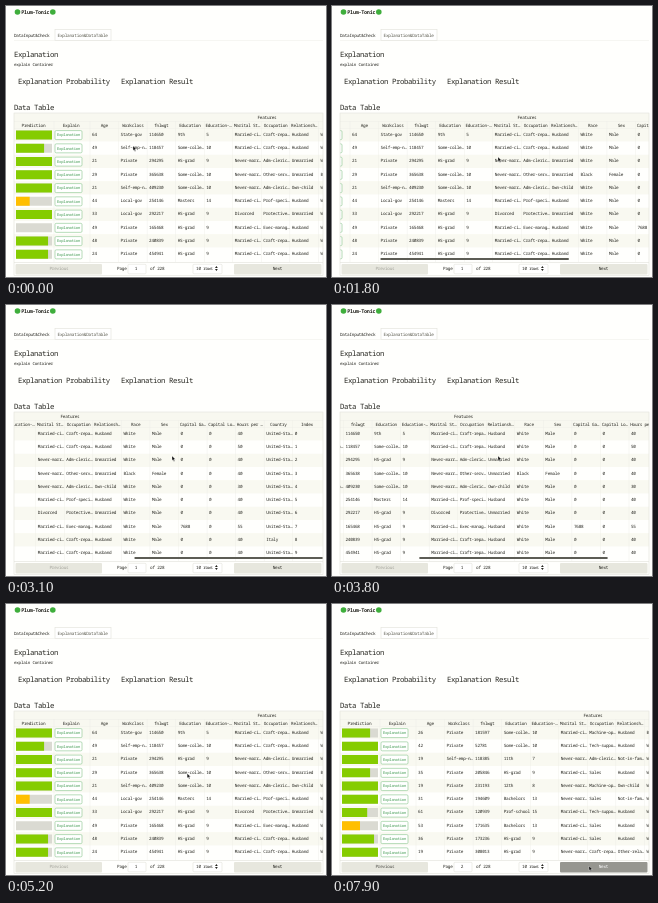
Write an HTML page that moves like this. It is 320 px wide and 271 px high and loops after 8 s.

```html
<!DOCTYPE html>
<html lang="en">
<head>
<meta charset="utf-8">
<title>Data table</title>
<style>
html, body { margin: 0; width: 100%; height: 100%; overflow: hidden; background: #fffffd; }
svg { display: block; width: 320px; height: 271px; }
text { font-family: "Noto Sans Mono", "DejaVu Sans Mono", monospace; font-weight: 500; letter-spacing: -.055em; text-rendering: geometricPrecision; white-space: pre; }
</style>
</head>
<body>
<svg id="stage" viewBox="0 0 320 271"></svg>
<script>
const INK = '#262620', LINE = '#ececE6', EDGE = '#e2e2da', BUTTON = '#e7e7de', LOOP = 8000;
const COL = 28.55, FIRST = 84, ROW = 13.25, TOP = 122.2, MAX = 197;

// fields: bar percentage, then one value per column
const pages = [`
100 64 State-gov 114650 9th 5 Married-civ-spouse Craft-repair Husband White Male 0 0 40 United-States 0
78 49 Self-emp-not-inc 118457 Some-college 10 Married-civ-spouse Craft-repair Husband White Male 0 0 50 United-States 1
100 21 Private 294295 HS-grad 9 Never-married Adm-clerical Unmarried White Male 0 0 40 United-States 2
100 29 Private 365638 Some-college 10 Never-married Other-service Unmarried Black Female 0 0 40 United-States 3
100 21 Self-emp-not-inc 409230 Some-college 10 Never-married Adm-clerical Own-child White Male 0 0 30 United-States 4
38 44 Local-gov 254146 Masters 14 Married-civ-spouse Prof-specialty Husband White Male 0 0 40 United-States 5
100 33 Local-gov 292217 HS-grad 9 Divorced Protective-serv Unmarried White Male 0 0 40 United-States 6
0 49 Private 165468 HS-grad 9 Married-civ-spouse Exec-managerial Husband White Male 7688 0 55 United-States 7
89 48 Private 240839 HS-grad 9 Married-civ-spouse Craft-repair Husband White Male 0 0 40 Italy 8
89 24 Private 454941 HS-grad 9 Married-civ-spouse Craft-repair Husband White Male 0 0 40 United-States 9`, `
78 26 Private 181597 Some-college 10 Married-civ-spouse Machine-op-inspct Husband Black
100 42 Private 52781 Some-college 10 Married-civ-spouse Tech-support Husband White
100 19 Self-emp-not-inc 118385 11th 7 Never-married Adm-clerical Not-in-family White
78 35 Private 205846 HS-grad 9 Married-civ-spouse Sales Husband White
100 19 Private 231193 12th 8 Never-married Machine-op-inspct Own-child White
100 31 Private 194609 Bachelors 13 Never-married Sales Not-in-family White
70 61 Private 120939 Prof-school 15 Married-civ-spouse Tech-support Husband White
50 53 Private 171635 Bachelors 13 Married-civ-spouse Sales Husband White
89 36 Private 173236 HS-grad 9 Married-civ-spouse Sales Husband White
100 19 Private 308013 HS-grad 9 Never-married Craft-repair Other-relative White`];

const heads = ['Age', 'Workclass', 'fnlwgt', 'Education', 'Education-num', 'Marital Status', 'Occupation',
  'Relationship', 'Race', 'Sex', 'Capital Gain', 'Capital Loss', 'Hours per week', 'Country', 'Index'];

const cut = s => s.length > 11 ? s.slice(0, 10) + '…' : s;
const rect = (x, y, w, h, fill, extra = '') =>
  `<rect x="${x}" y="${y}" width="${w}" height="${h}" fill="${fill}" ${extra}/>`;
// pitch is the advance of one character
const text = (x, y, s, pitch = 2.38, extra = '') =>
  `<text x="${x}" y="${y}" font-size="${pitch / .545}" fill="${INK}" ${extra}>${s.replace('&', '&amp;')}</text>`;
const mid = (x, y, s, extra = '') => text(x, y, s, 2.38, `text-anchor="middle" ${extra}`);
const outline = color => `stroke="${color}" stroke-width=".6"`;

function tableRow(line, i) {
  const [bar, ...cells] = line.split(' '), y = TOP + ROW * i;
  return rect(10, y + 2.3, 36, 9, '#dadad2')
    + rect(10, y + 2.3, 36 * bar / 100, 9, bar > 60 ? '#85cc00' : '#ffbf00')
    + rect(49, y + 2.4, 27, 9, '#fff', `rx="1.2" ${outline('#86c48c')}`)
    + text(51, y + 8.2, 'Explanation', 2.1, 'style="fill:#3f9a50"')
    + cells.map((s, c) => text(FIRST + 2 + COL * c, y + 7.7, cut(s))).join('');
}

function header() {
  return mid(27.5, 121, 'Prediction') + mid(65, 121, 'Explain') + mid(261, 113.2, 'Features')
    + heads.map((s, c) => mid(FIRST + COL * (c + .5), 121, cut(s))).join('')
    + [48, ...heads.map((_, c) => FIRST + COL * c)].map(x => rect(x - .2, 115, .4, 141, LINE)).join('');
}

const stripes = [0, 2, 4, 6, 8].map(i => rect(8, TOP + ROW * i, 309, ROW, '#f9f9f1')).join('');

stage.innerHTML = `
<clipPath id="view"><rect x="8" y="107" width="309" height="149"/></clipPath>
<circle cx="11.5" cy="6" r="2.8" fill="#3fae3c"/><circle cx="46.8" cy="6" r="2.8" fill="#3fae3c"/>
${text(15.3, 8, 'Plum-Tonic', 2.8, 'style="font-weight:600"')}
${rect(8, 34, 309, .5, LINE)}
${rect(49, 23.5, 56, 11, '#fff', outline(EDGE))}
${text(8, 30.8, 'DataInput&Check', 2.36)}
${text(51.5, 30.8, 'Explanation&DataTable', 2.4, 'style="fill:#5c5c50"')}
${text(8, 51, 'Explanation', 4)}
${text(8, 60, 'explain Container', 2.3)}
${text(12, 77.5, 'Explanation Probability', 4)}
${text(115, 77.5, 'Explanation Result', 4)}
${text(8, 103.5, 'Data Table', 4)}
${rect(8, 107, 309, 15.2, '#f8f8f0')}${stripes}
<g clip-path="url(#view)"><g id="body">${header()}
${pages.map(p => `<g class="page">${p.trim().split('\n').map(tableRow).join('')}</g>`).join('')}</g></g>
${rect(8, 115, 309, .5, LINE)}${rect(8, 122, 309, .5, LINE)}
<rect id="thumb" y="252" width="188.7" height="2" rx="1" fill="#5c5c54"/>
${rect(8, 107, 309, 162.5, 'none', outline(EDGE))}
${rect(8, 256, 309, .6, EDGE)}
${rect(9.5, 258, 86.5, 10.5, BUTTON, 'rx="1"')}
${mid(53, 264, 'Previous', 'id="prev"')}
${text(111, 264, 'Page')}
${rect(122, 258.3, 18, 9.5, '#fff', `rx="1" ${outline(EDGE)}`)}
${mid(130, 264, '1', 'id="num"')}
${text(144, 264, 'of 228')}
${rect(187, 258.3, 29, 9.5, '#fff', `rx="1" ${outline(EDGE)}`)}
${text(190, 264, '10 rows')}
<path d="M209 262l1.4-2 1.4 2zM209 263l1.4 2 1.4-2z" fill="${INK}"/>
${rect(228, 258, 87.5, 10.5, BUTTON, 'rx="1" id="next"')}
${mid(271.5, 264, 'Next', 'id="nextLabel"')}
<path id="cursor" d="M0 0v4.6l1.1-1 .8 1.8.8-.4-.8-1.7h1.5z" fill="#111" stroke="#fff" stroke-width=".3"/>`;

// piecewise linear value through [time, value] points
function track(points, t) {
  const k = points.findIndex(p => p[0] > t);
  if (k < 0) return points.at(-1)[1];
  if (!k) return points[0][1];
  const [t0, a] = points[k - 1], [t1, b] = points[k];
  return a + (b - a) * (t - t0) / (t1 - t0);
}

const scrollX = [[1200, 0], [1800, 66], [2600, 166], [2900, MAX], [3400, MAX], [3700, 150], [4200, 48], [4400, 14], [4600, 0]];
const thumbAlpha = [[1200, 0], [1300, 1], [4900, 1], [5200, 0]];
const cursorX = [[200, 127], [1000, 166], [5000, 166], [6200, 257]];
const cursorY = [[200, 140], [1000, 151], [5000, 151], [6200, 262]];
const pageEls = document.querySelectorAll('.page');
const get = id => document.getElementById(id);
const set = (id, name, value) => get(id).setAttribute(name, value);

function draw(now) {
  const t = Math.floor(now % LOOP / 100) * 100;
  const x = track(scrollX, t), page = t < 7300 ? 0 : 1, hover = t >= 6700;
  set('body', 'transform', `translate(${-x})`);
  set('thumb', 'x', 8 + x * 309 / 506);
  set('thumb', 'opacity', track(thumbAlpha, t));
  set('cursor', 'transform', `translate(${track(cursorX, t)} ${track(cursorY, t)})`);
  pageEls.forEach((el, i) => el.style.display = i === page ? '' : 'none');
  get('num').textContent = page + 1;
  set('prev', 'opacity', page ? .8 : .35);
  set('next', 'fill', hover ? '#969690' : BUTTON);
  set('nextLabel', 'fill', hover ? '#fff' : INK);
}

const start = performance.now();
(function tick() {
  draw(performance.now() - start);
  requestAnimationFrame(tick);
})();
</script>
</body>
</html>
```
